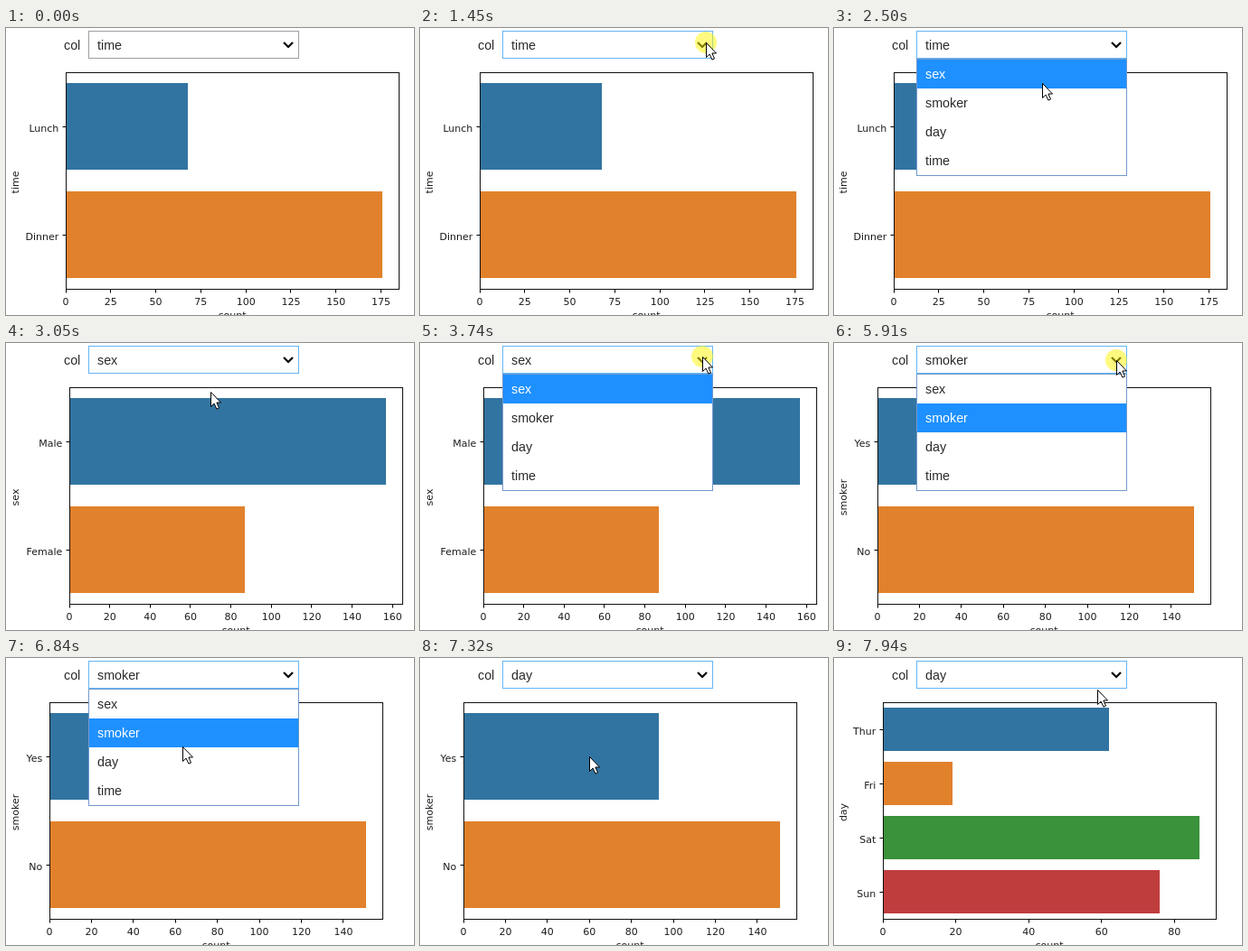
Animation, 451 px wide and 318 px high, one loop 8 s. Source, as an HTML page with a canvas:

```html
<!DOCTYPE html>
<html lang="en">
<head>
<meta charset="utf-8">
<title>Count plot by column</title>
<style>
  html, body { margin: 0; width: 100%; height: 100%; overflow: hidden; background: #fff; }
  canvas { display: block; width: 451px; height: 318px; }
</style>
</head>
<body>
<canvas id="stage" width="451" height="318"></canvas>
<script>
const LOOP = 8000;
const ctx = document.getElementById('stage').getContext('2d');

const UI_FONT = '14.3px "Liberation Sans", Arial, sans-serif';
const PLOT_FONT = '11px "DejaVu Sans", Verdana, sans-serif';
const PLOT_INK = '#1c1c1c';
const UI_INK = '#2a2a2a';
const COLORS = ['#3274a1', '#e1812c', '#3a923a', '#c03d3e'];
const OPTIONS = ['sex', 'smoker', 'day', 'time'];

const AXES = { top: 49, width: 368, height: 240 };
const MENU = { left: 91, right: 324, top: 35, row: 32 };

const CHARTS = {
  time: { left: 66, tick: 25, bars: [['Lunch', 68], ['Dinner', 176]] },
  sex: { left: 70, tick: 20, bars: [['Male', 157], ['Female', 87]] },
  smoker: { left: 48, tick: 20, bars: [['Yes', 93], ['No', 151]] },
  day: { left: 54, tick: 20, bars: [['Thur', 62], ['Fri', 19], ['Sat', 87], ['Sun', 76]] }
};

// [time, value] pairs; each value holds until the next one
const CHART_AT = [[0, 'time'], [3050, 'sex'], [4750, 'smoker'], [7470, 'day']];
const VALUE_AT = [[0, 'time'], [2900, 'sex'], [4680, 'smoker'], [7320, 'day']];
const OPEN = [[1520, 2900], [3740, 4680], [5910, 7320]];
const PRESS = [[1450, 1590], [2650, 2730], [3740, 3820], [4520, 4600], [5910, 5980], [7080, 7150]];
const FOCUS_AT = PRESS[0][0];

const linear = u => u;
const easeOut = u => u * (2 - u);
const smooth = u => u * u * (3 - 2 * u);

// Pointer moves: first step, last step, step count, end point, easing
const START = [373, 280];
const MOVES = [
  [500, 1140, 9, [316, 16], easeOut],
  [1970, 2350, 6, [229, 59], smooth],
  [2500, 2500, 1, [230, 61], linear],
  [2580, 2650, 2, [226, 54], linear],
  [3200, 3590, 6, [312, 15], smooth],
  [4060, 4370, 5, [218, 77], smooth],
  [4750, 5060, 5, [282, 50], smooth],
  [5210, 5520, 5, [330, 27], smooth],
  [5600, 5830, 4, [312, 19], smooth],
  [6130, 6840, 10, [195, 98], smooth],
  [6910, 6910, 1, [189, 107], linear],
  [7080, 7080, 1, [187, 109], linear],
  [7470, 7940, 7, [291, 35], smooth]
];

const during = (spans, t) => spans.some(([a, b]) => t >= a && t < b);
const latest = (list, t) => list.filter(([at]) => t >= at).pop()[1];

function pointerAt(t) {
  if (t < MOVES[0][0]) return null;
  let from = START;
  for (const [t0, t1, steps, to, ease] of MOVES) {
    if (t < t0) break;
    if (t < t1) {
      const step = Math.floor((t - t0 + 2) / (t1 - t0) * (steps - 1));
      const u = ease((step + 1) / steps);
      return from.map((v, i) => Math.round(v + (to[i] - v) * u));
    }
    from = to;
  }
  return from;
}

function text(str, x, y, align, color) {
  ctx.textAlign = align;
  ctx.fillStyle = color;
  ctx.fillText(str, x, y);
}

function line(color, width, ...points) {
  ctx.strokeStyle = color;
  ctx.lineWidth = width;
  ctx.beginPath();
  points.forEach(([x, y]) => ctx.lineTo(x, y));
  ctx.stroke();
}

function box(color, x, y, w, h) {
  ctx.fillStyle = '#fff';
  ctx.fillRect(x, y, w, h);
  ctx.strokeStyle = color;
  ctx.lineWidth = 1;
  ctx.strokeRect(x + 0.5, y + 0.5, w - 1, h - 1);
}

function drawChart(name) {
  const { left, tick, bars } = CHARTS[name];
  const { top, width, height } = AXES;
  const limit = Math.max(...bars.map(b => b[1])) * 1.05;
  const scale = width / limit;
  const slot = height / bars.length;
  const edge = left + 0.5;
  const base = top + height + 0.5;

  ctx.font = PLOT_FONT;
  bars.forEach(([label, count], i) => {
    const mid = top + slot * (i + 0.5);
    ctx.fillStyle = COLORS[i];
    ctx.fillRect(left, mid - slot * 0.4, Math.round(count * scale), slot * 0.8);
    line('#000', 1, [edge - 4, mid + 0.5], [edge, mid + 0.5]);
    text(label, left - 7.7, mid + 5.5, 'right', PLOT_INK);
  });
  for (let v = 0; v < limit; v += tick) {
    const x = Math.floor(left + v * scale) + 0.5;
    line('#000', 1, [x, base], [x, base + 4]);
    text(v, left + v * scale, 306.5, 'center', PLOT_INK);
  }
  ctx.strokeStyle = '#111';
  ctx.lineWidth = 1;
  ctx.strokeRect(edge, top + 0.5, width, height);

  text('count', left + width / 2, 321.5, 'center', PLOT_INK);
  ctx.save();
  ctx.translate(14, 171);
  ctx.rotate(-Math.PI / 2);
  text(name, 0, 0, 'center', PLOT_INK);
  ctx.restore();
}

function drawSelect(value, focused) {
  ctx.font = UI_FONT;
  text('col', 64, 24, 'left', UI_INK);
  box(focused ? '#64b5f6' : '#9e9e9e', 91, 3, 233, 31);
  text(value, 101, 24, 'left', UI_INK);
  line('#000', 2.2, [307, 16], [312, 21], [317, 16]);
}

function drawMenu(value, [px, py]) {
  const { left, right, top, row } = MENU;
  const over = Math.floor((py - top) / row);
  const inside = px > left && px < right && over >= 0 && over < OPTIONS.length;
  const active = inside ? over : OPTIONS.indexOf(value);

  box('#7299cb', left, top - 1, right - left, row * OPTIONS.length + 2);
  OPTIONS.forEach((name, i) => {
    const y = top + i * row;
    if (i === active) {
      ctx.fillStyle = '#1e90ff';
      ctx.fillRect(left + 1, y, right - left - 2, row);
    }
    text(name, 101, y + 21, 'left', i === active ? '#fff' : UI_INK);
  });
}

function drawPointer([x, y], pressed) {
  if (pressed) {
    ctx.fillStyle = 'rgba(255, 245, 0, 0.5)';
    ctx.beginPath();
    ctx.arc(x, y, 12, 0, Math.PI * 2);
    ctx.fill();
  }
  ctx.save();
  ctx.translate(x + 0.5, y + 0.5);
  ctx.beginPath();
  [[0, 0], [0, 16], [3.6, 12.6], [6.4, 18.6], [9, 17.5], [6.4, 11.5], [11, 11.5]]
    .forEach(([px, py]) => ctx.lineTo(px, py));
  ctx.closePath();
  ctx.fillStyle = '#fff';
  ctx.fill();
  ctx.strokeStyle = '#000';
  ctx.lineWidth = 1;
  ctx.stroke();
  ctx.restore();
}

function draw(t) {
  const pointer = pointerAt(t);
  const value = latest(VALUE_AT, t);
  ctx.fillStyle = '#fff';
  ctx.fillRect(0, 0, 451, 318);
  drawChart(latest(CHART_AT, t));
  drawSelect(value, t >= FOCUS_AT);
  if (during(OPEN, t)) drawMenu(value, pointer);
  if (pointer) drawPointer(pointer, during(PRESS, t));
}

const begin = performance.now();
function tick() {
  draw((performance.now() - begin) % LOOP);
  requestAnimationFrame(tick);
}
tick();
</script>
</body>
</html>
```
